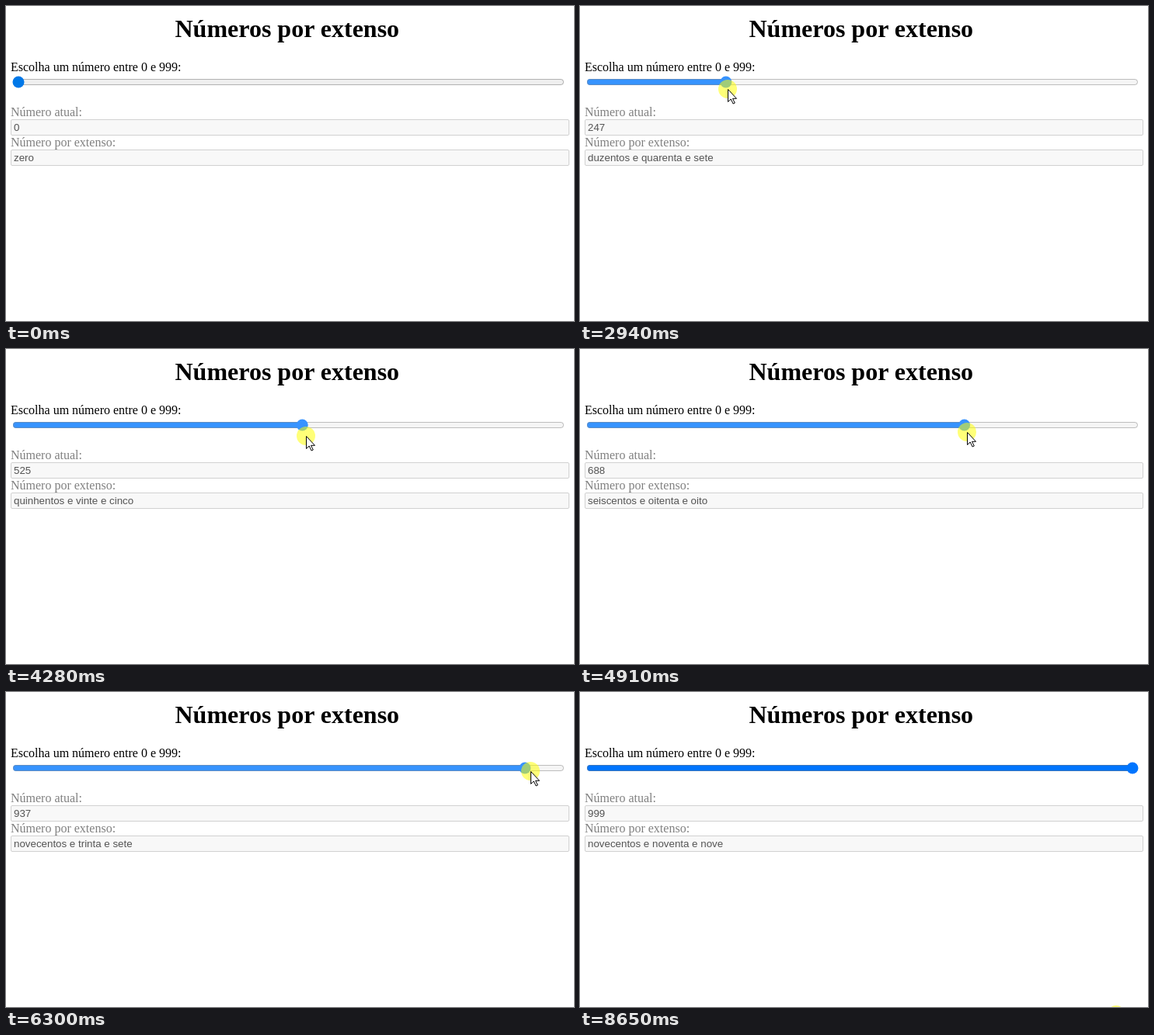
Write an HTML page that moves like this. It is 731 by 406 pixels and loops after 8720 ms.

```html
<!DOCTYPE html>
<html lang="pt">
<head>
<meta charset="utf-8">
<title>Números por extenso</title>
<style>
  html, body { margin: 0; width: 100%; height: 100%; overflow: hidden; background: #fff; }
  svg { display: block; }
  text { font: 16px "Liberation Serif", "Times New Roman", serif; }
  .title { font-size: 32px; font-weight: bold; }
  .dim { fill: #808080; }
  .value { font: 13.333px "Liberation Sans", Arial, sans-serif; fill: #545454; }
  .field { fill: #f8f8f8; stroke: #d1d1d1; }
</style>
</head>
<body>
<svg width="731" height="406" viewBox="0 0 731 406">
  <text class="title" x="217.5" y="40">Números por extenso</text>
  <text x="6" y="84">Escolha um número entre 0 e 999:</text>
  <rect id="track" x="9" y="94" width="709" height="8" rx="4"/>
  <rect id="fill" x="9" y="94" height="8" rx="4"/>
  <rect id="border" x="9.5" y="94.5" width="708" height="7" rx="3.5" fill="none" stroke-opacity=".5"/>
  <circle id="thumb" cy="98" r="7.5"/>
  <text class="dim" x="6" y="142">Número atual:</text>
  <rect class="field" x="6.5" y="146.5" width="718" height="20" rx="1.5"/>
  <text class="value" id="digits" x="10" y="161"></text>
  <text class="dim" x="6" y="181">Número por extenso:</text>
  <rect class="field" x="6.5" y="185.5" width="718" height="20" rx="1.5"/>
  <text class="value" id="words" x="10" y="200"></text>
  <g id="pointer">
    <circle r="12" fill="#ff0" fill-opacity=".53"/>
    <path d="M.5.5v16l3.7-3.5 2.9 6 2.2-1-2.8-5.7h5z" fill="#fff" stroke="#000"/>
  </g>
</svg>
<script>
const LOOP = 8720;
const HOVER = 1200, PRESS = 1330, RELEASE = 7690;

// [time, pointer x, pointer y, number]; the pointer waits below the stage
const keys = [
  [329, 702, 420, 0], [330, 702, 297, 0], [1160, 20, 102, 0], [PRESS, 18, 96, 0],
  [1630, 58, 96, 47], [2940, 190, 107, 247], [4280, 386, 112, 525], [5540, 610, 103, 851],
  [6850, 722, 101, 999], [RELEASE, 728, 102, 999], [8320, 700, 420, 999],
  [8580, 690, 420, 999], [8650, 690, 416, 999]
];
// [until, accent, track, border]
const phases = [
  [HOVER, '#0078e8', '#efefef', '#767676'],
  [PRESS, '#005cc8', '#e5e5e5', '#4f4f4f'],
  [RELEASE, '#3793ff', '#f5f5f5', '#858585'],
  [LOOP, '#0075ff', '#efefef', '#767676']
];

const small = ('zero um dois três quatro cinco seis sete oito nove dez onze doze treze quatorze ' +
  'quinze dezesseis dezessete dezoito dezenove').split(' ');
const tens = '- - vinte trinta quarenta cinquenta sessenta setenta oitenta noventa'.split(' ');
const hundreds = ('- cento duzentos trezentos quatrocentos quinhentos seiscentos setecentos ' +
  'oitocentos novecentos').split(' ');

function spell(n) {
  if (n < 20) return small[n];
  if (n === 100) return 'cem';
  const unit = n < 100 ? 10 : 100;
  const head = (n < 100 ? tens : hundreds)[Math.floor(n / unit)];
  return n % unit ? head + ' e ' + spell(n % unit) : head;
}

function poseAt(t) {
  const i = keys.findIndex(k => k[0] > t);
  const b = keys.at(i), a = keys[i - 1] || b;
  const p = a === b ? 0 : (t - a[0]) / (b[0] - a[0]);
  return a.map((v, j) => Math.round(v + (b[j] - v) * p));
}

const $ = id => document.getElementById(id);
const set = (id, attrs) => {
  for (const name in attrs) $(id).setAttribute(name, attrs[name]);
};

function draw(t) {
  const [, x, y, n] = poseAt(t);
  const [, accent, track, border] = phases.find(p => t < p[0]);
  const thumbX = 16 + 695 * n / 999;
  set('track', { fill: track });
  set('fill', { width: thumbX - 9, fill: accent });
  set('border', { stroke: border });
  set('thumb', { cx: thumbX, fill: accent });
  set('pointer', { transform: `translate(${x} ${y})` });
  $('digits').textContent = n;
  $('words').textContent = spell(n);
}

const start = performance.now();
function tick() {
  draw((performance.now() - start) % LOOP);
  requestAnimationFrame(tick);
}
tick();
</script>
</body>
</html>
```
